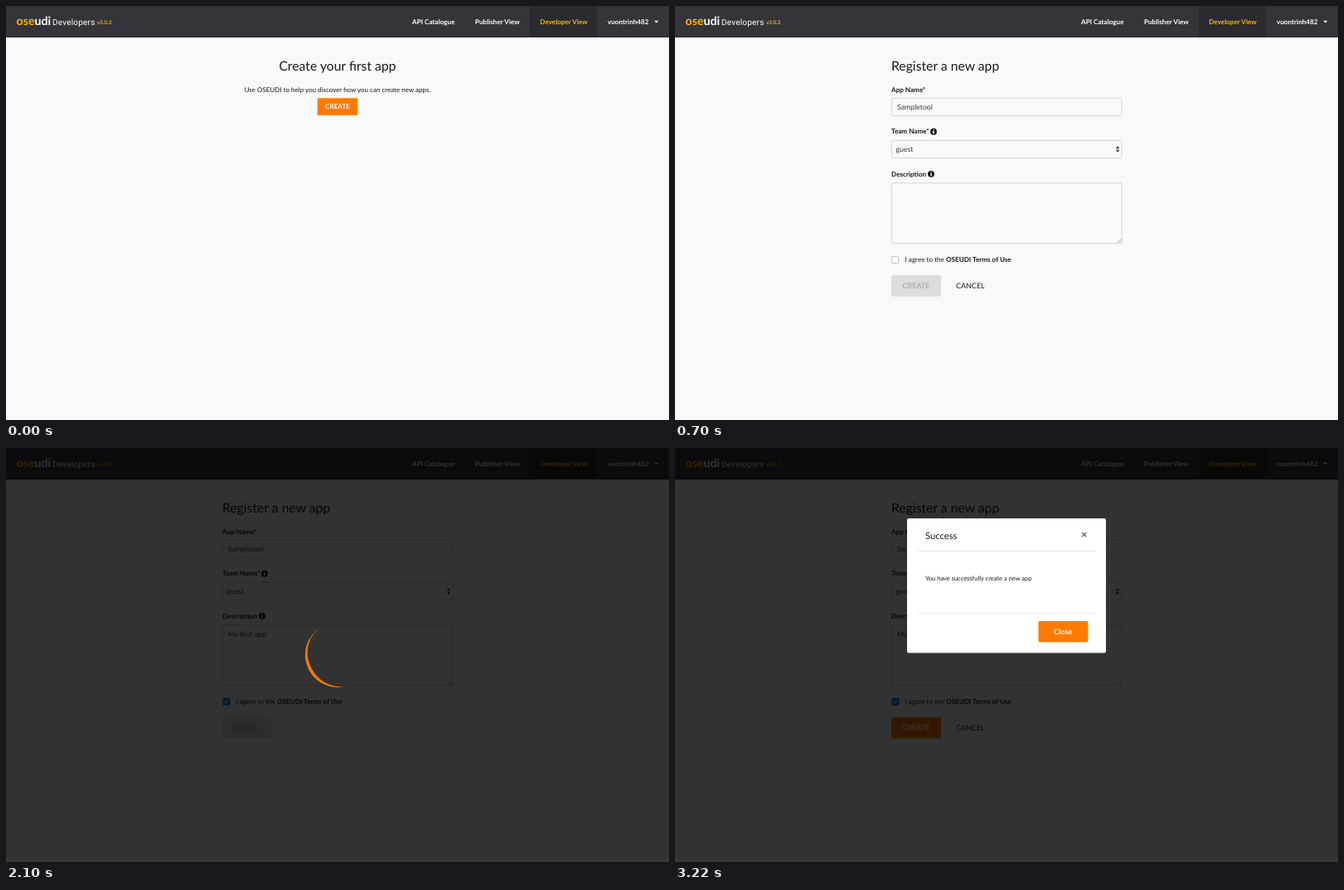
These frames come from a looping animation (800x500 px, 3.5 s). An HTML page:

```html
<!DOCTYPE html>
<html lang="en">
<head>
<meta charset="utf-8">
<title>Register an app</title>
<style>
  html, body { margin: 0; width: 100%; height: 100%; overflow: hidden; background: #f9f9f9; }
  svg { display: block; width: 800px; height: 500px; font: 8.13px Lato, sans-serif; text-rendering: geometricPrecision; }
  text { fill: #1a1a1a; }
  .b { font-weight: 700; }
  .mid { text-anchor: middle; }
  .h1 { font-size: 15.75px; }
  .field { font-size: 8.75px; fill: #3a3a3a; }
  .btn { font-size: 9px; text-anchor: middle; }
  .box { fill: #f9f9f9; stroke: #ccc; stroke-width: .8; }
  .white, .white text { fill: #fff; }
  .gold, .white .gold { fill: #ffb600; }
  .orange { fill: #ff7a00; }
  .muted { fill: #a0a0a0; }
  [data-in] { visibility: hidden; }
  [data-in].on { visibility: visible; }
</style>
</head>
<body>
<svg viewBox="0 0 800 500">
  <defs>
    <g id="info">
      <circle r="3.9" fill="#111"/>
      <path d="M-.7-2.5h1.4v1.2h-1.4zM-1.1-.6H.7V1.6h.5v.8h-2.3v-.8h.5V.2h-.5z" fill="#fff"/>
    </g>
  </defs>

  <rect width="800" height="500" fill="#f9f9f9"/>

  <g data-in="0">
    <rect width="800" height="500" fill="#f8f9fa"/>
    <text class="h1 mid" x="400" y="78">Create your first app</text>
    <text class="mid" x="400" y="103.7" font-size="8">Use OSEUDI to help you discover how you can create new apps.</text>
    <rect class="orange" x="375.7" y="111.3" width="48.6" height="20.6"/>
    <text class="b mid white" x="400" y="124.4">CREATE</text>
  </g>

  <g data-in="1234">
    <text class="h1" x="261" y="78">Register a new app</text>
    <text class="b" x="261" y="103.7">App Name*</text>
    <rect class="box" x="261.4" y="111.4" width="277.8" height="21" rx="1.5"/>
    <text class="field" x="268" y="125">Sampletool</text>

    <text class="b" x="261" y="154.4">Team Name*</text>
    <use href="#info" x="312" y="151.7"/>
    <rect class="box" x="261.4" y="162.4" width="277.8" height="21.2" rx="2"/>
    <text class="field" x="266.5" y="176">guest</text>
    <path d="M532 172.2l2.1-3.2 2.1 3.2zM532 173.8h4.2l-2.1 3.2z" fill="#333"/>

    <text class="b" x="261" y="205.7">Description</text>
    <use href="#info" x="309" y="202.8"/>
    <rect class="box" x="261.4" y="213.8" width="277.8" height="73" rx="1"/>
    <path d="M533.5 286l5-5M536 286l2.5-2.5" stroke="#888" stroke-width=".7"/>
    <text class="field" data-in="234" x="268" y="227.6">My first app</text>

    <rect x="261.7" y="302.3" width="8.2" height="8.2" rx="1.5" fill="#fff" stroke="#aaa" stroke-width=".8"/>
    <g data-in="234">
      <rect x="261.3" y="301.9" width="9" height="9" rx="1.7" fill="#1a82f0"/>
      <path d="M263.6 306.6l1.6 1.7 2.9-3.9" fill="none" stroke="#fff" stroke-width="1.2"/>
    </g>
    <text x="277.5" y="309.4">I agree to the <tspan class="b">OSEUDI Terms of Use</tspan></text>

    <rect data-in="13" x="261" y="325.2" width="60" height="25.6" rx="2" fill="#dcdcdc"/>
    <text data-in="1" class="btn muted" x="291" y="341.2">CREATE</text>
    <text data-in="3" class="btn muted" x="291" y="341.2">Loading...</text>
    <g data-in="24">
      <rect class="orange" x="261" y="325.2" width="60" height="25.6" rx="2"/>
      <text class="btn b white" x="291" y="341.2">CREATE</text>
    </g>
    <text data-in="124" class="btn" x="356.3" y="341.2">CANCEL</text>
  </g>

  <g class="white">
    <rect width="800" height="38" fill="#35343b"/>
    <rect x="632" width="81" height="38" fill="#2b2a2f"/>
    <rect y="37" width="800" height="1" fill="#28272c"/>
    <text class="b" x="12.5" y="23" font-size="14.2"><tspan class="gold">ose</tspan>udi</text>
    <text x="56" y="23" font-size="10" font-family="Roboto, sans-serif" letter-spacing=".2">Developers</text>
    <text class="b gold" x="110" y="22.4" font-size="6.4">v3.0.2</text>
    <g class="b">
      <text x="490" y="21.9">API Catalogue</text>
      <text x="566" y="21.9">Publisher View</text>
      <text class="gold" x="644.3" y="21.9">Developer View</text>
      <text x="726" y="21.9">vuontrinh482</text>
      <path d="M782.2 17.7h5.2l-2.6 2.7z"/>
    </g>
  </g>

  <g data-in="34">
    <rect width="800" height="500" fill="#000" opacity=".8"/>
    <rect y="496" width="800" height="4" fill="#383638"/>
  </g>

  <path data-in="3" class="orange" transform="translate(400 250) rotate(-28)"
        d="M0-39A39 39 0 0 0 0 39A35.4 39 0 0 1 0-39"/>

  <g data-in="4">
    <rect class="white" x="280" y="85" width="240" height="162.5" rx="2"/>
    <text x="302" y="110.3" font-size="11.25">Success</text>
    <path d="M491.2 102l5.2 5.2M496.4 102l-5.2 5.2" stroke="#777" stroke-width="1.6"/>
    <path d="M292.5 124.6h215.5M292.5 199.4h215.5" stroke="#e5e5e5" stroke-width=".8"/>
    <text x="302" y="159.8" font-size="7.5">You have successfully create a new app</text>
    <rect class="orange" x="438.4" y="209" width="60" height="25.6" rx="2"/>
    <text class="btn b white" x="468.2" y="225">Close</text>
  </g>
</svg>
<script>
  const STEP = 700, SCENES = 5;
  const parts = [...document.querySelectorAll('[data-in]')];
  let shown = -1;

  function show(scene) {
    for (const el of parts) el.classList.toggle('on', el.dataset.in.includes(scene));
  }

  function tick() {
    const scene = Math.floor(performance.now() / STEP) % SCENES;
    if (scene !== shown) show(shown = scene);
    requestAnimationFrame(tick);
  }
  tick();
</script>
</body>
</html>
```
